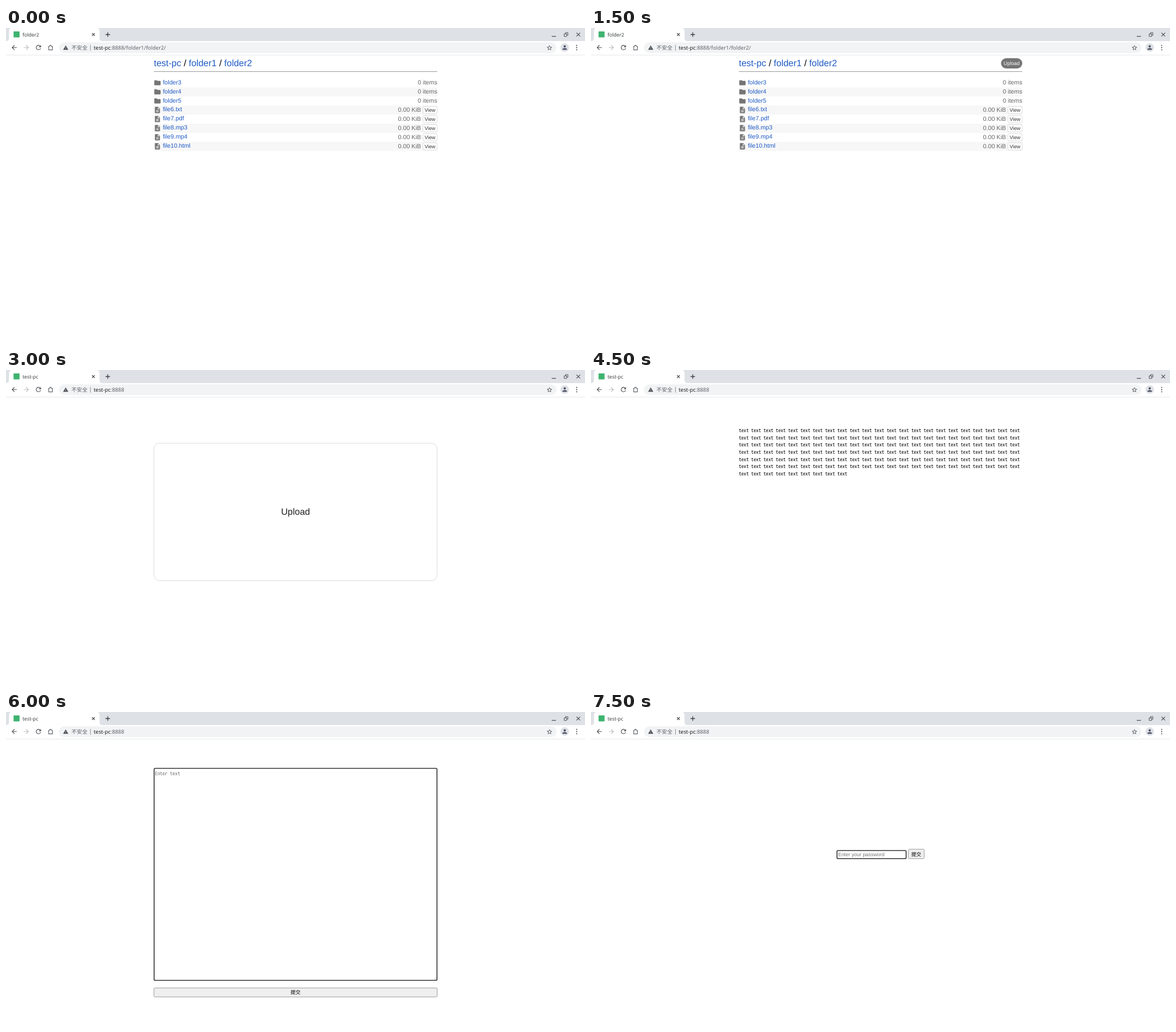
Animation of 1017 by 551 pixels, one loop 9000 ms. Source, as an HTML page with a canvas:

```html
<!DOCTYPE html>
<html lang="en">
<head>
<meta charset="utf-8">
<style>
html, body { margin: 0; width: 100%; height: 100%; overflow: hidden; background: #fff; }
canvas { display: block; }
</style>
</head>
<body>
<canvas width="1017" height="551"></canvas>
<script>
const ctx = document.querySelector('canvas').getContext('2d');
ctx.textRendering = 'geometricPrecision';

const SANS = '"Liberation Sans", Arial, sans-serif';
const UI = '"Noto Sans", "Noto Sans CJK SC", sans-serif';
const CJK = '"Noto Sans CJK SC", sans-serif';
const MONO = '"Noto Sans Mono CJK SC", "Noto Sans Mono CJK JP", monospace';
const BODY = 10.667, SMALL = 8.889;
const LINK = '#205bc6', INK = '#3c4043', ICON = '#4d5156', GRAY = '#757575';
const LEFT = 259.7, RIGHT = 757.5, MIDDLE = 508.6;

const PATHS = {
  folder: 'M10 4H4c-1.1 0-2 .9-2 2v12c0 1.1.9 2 2 2h16c1.1 0 2-.9 2-2V8c0-1.1-.9-2-2-2h-8z',
  file: 'M14 2H6c-1.1 0-2 .9-2 2v16c0 1.1.9 2 2 2h12c1.1 0 2-.9 2-2V8zm2 16H8v-2h8zm0-4H8v-2h8zm-3-5V3.5L18.5 9z',
  back: 'M20 11H7.83l5.59-5.59L12 4l-8 8 8 8 1.41-1.41L7.83 13H20z',
  reload: 'M17.65 6.35A8 8 0 1 0 19.73 14h-2.08A6 6 0 1 1 16.22 7.78L13 11h7V4z',
  home: 'M12 3L3 10h2v11h14V10h2zM7 19V9.4l5-3.9 5 3.9V19z',
  warning: 'M1 21h22L12 2zm12-3h-2v-2h2zm0-4h-2v-4h2z',
  star: 'M22 9.24l-7.19-.62L12 2 9.19 8.63 2 9.24l5.46 4.73L5.82 21 12 17.27 18.18 21l-1.63-7.03zM12 15.4l-3.76 2.27 1-4.28-3.32-2.88 4.38-.38L12 6.1l1.71 4.04 4.38.38-3.32 2.88 1 4.28z',
  person: 'M12 12a4 4 0 1 0 0-8 4 4 0 0 0 0 8zm0 2c-2.67 0-8 1.34-8 4v2h16v-2c0-2.66-5.33-4-8-4z'
};

function text(str, x, y, size, color, font = SANS, align = 'left') {
  ctx.font = `${size}px ${font}`;
  ctx.fillStyle = color;
  ctx.textAlign = align;
  ctx.fillText(str, x, y);
  return x + ctx.measureText(str).width;
}

function rect(x, y, w, h, fill, radius = 0, border, line = 0.7) {
  ctx.beginPath();
  ctx.roundRect(x, y, w, h, radius);
  if (fill) { ctx.fillStyle = fill; ctx.fill(); }
  if (border) { ctx.strokeStyle = border; ctx.lineWidth = line; ctx.stroke(); }
}

function disc(x, y, r, color) {
  ctx.beginPath();
  ctx.arc(x, y, r, 0, 7);
  ctx.fillStyle = color;
  ctx.fill();
}

function stroke(path, color, width) {
  ctx.strokeStyle = color;
  ctx.lineWidth = width;
  ctx.stroke(new Path2D(path));
}

// Draws a 24-unit icon centred on (x, y).
function icon(name, x, y, color = ICON, size = 13.33, flip = 1) {
  ctx.save();
  ctx.translate(x, y);
  ctx.scale(flip * size / 24, size / 24);
  ctx.translate(-12, -12);
  ctx.fillStyle = color;
  ctx.fill(new Path2D(PATHS[name]), 'evenodd');
  ctx.restore();
}

function chrome(title, path) {
  rect(0, 0, 1017, 23, '#dee1e6');
  ctx.fillStyle = '#fff';
  ctx.fill(new Path2D('M0 23Q5.3 23 5.3 17.5V5.5Q5.3 0 10.5 0H159Q164.3 0 164.3 5.5V17.5Q164.3 23 169.5 23Z'));
  rect(13.3, 6, 10.5, 10.5, '#3eb370', 0.7);
  text(title, 29, 15, 8.667, INK, UI);
  stroke('M151.1 9.1l4.8 4.8m0-4.8l-4.8 4.8', INK, 1.2);
  stroke('M174.8 11.5h7.8m-3.9-3.9v7.8', INK, 1.3);
  stroke('M958.6 14.6h7.4M1002 8.3l6.4 6.4m0-6.4l-6.4 6.4', ICON, 1.2);
  stroke('M980.4 10.4h4.4v4.4h-4.4zM982.6 10v-1.8h4.4v4.4h-1.8', ICON, 1);

  icon('back', 14.5, 34.3);
  icon('back', 35.7, 34.3, '#babcbe', 13.33, -1);
  icon('reload', 57, 34.3);
  icon('home', 78.2, 34.3, ICON, 12.6);
  rect(93, 25.3, 874, 18.7, '#f1f3f4', 9.35);
  icon('warning', 104.9, 34.6, ICON, 10);
  text('不安全', 115, 38, 9.333, '#5f6368', CJK);
  rect(147.9, 29.7, 0.8, 10, '#70757a');
  const end = text('test-pc', 154, 37.8, 9.333, '#202124', UI);
  text(':8888' + path, end, 37.8, 9.333, '#5f6368', UI);
  icon('star', 954.6, 34.7, ICON, 11.5);
  disc(981.4, 34.3, 7.5, '#dee1e6');
  icon('person', 981.4, 34.3, '#4b5063', 12);
  for (const y of [30.6, 34.4, 38.2]) disc(1002.4, y, 1.05, ICON);
  rect(0, 47, 1017, 0.8, '#dfe1e4');
}

function listing(canUpload) {
  chrome('folder2', '/folder1/folder2/');
  let x = LEFT;
  for (const [str, color] of [['test-pc', LINK], [' / ', '#000'], ['folder1', LINK], [' / ', '#000'], ['folder2', LINK]])
    x = text(str, x, 67.2, 16, color);
  rect(LEFT, 76.1, RIGHT - LEFT, 0.9, '#999');
  if (canUpload) {
    rect(720.2, 53, 37.3, 18, GRAY, 9);
    text('Upload', 738.9, 65, SMALL, '#fff', SANS, 'center');
  }
  const names = ['folder3', 'folder4', 'folder5', 'file6.txt', 'file7.pdf', 'file8.mp3', 'file9.mp4', 'file10.html'];
  names.forEach((name, i) => {
    const y = 88.3 + i * 15.93, isFile = i > 2;
    if (i % 2) rect(LEFT, y, RIGHT - LEFT, 15.93, '#f7f7f7');
    icon(isFile ? 'file' : 'folder', 266, y + 7.8, GRAY);
    text(name, 275.4, y + 10.4, BODY, LINK);
    if (isFile) {
      text('0.00 KiB', 728.9, y + 11, BODY, '#666', SANS, 'right');
      rect(732.3, y + 1.6, 24.9, 12.6, '#fff', 2, '#ccc');
      text('View', 744.7, y + 11.1, SMALL, '#333', SANS, 'center');
    } else {
      text('0 items', RIGHT, y + 10.4, BODY, '#666', SANS, 'right');
    }
  });
}

function submitButton(x, y, w, h, baseline) {
  rect(x, y, w, h, '#efefef', 1.7, '#767676');
  text('提交', x + w / 2, baseline, SMALL, '#000', CJK, 'center');
}

function page(draw) {
  return () => { chrome('test-pc', ''); draw(); };
}

const scenes = [
  () => listing(false),
  () => listing(true),
  page(() => {
    rect(259.8, 128.4, 497.4, 241.2, null, 10, '#ccc');
    text('Upload', MIDDLE, 254, 16, '#222', SANS, 'center');
  }),
  page(() => {
    for (let row = 0; row < 7; row++)
      text('text '.repeat(row < 6 ? 23 : 9), LEFT, 109 + row * 12.667, 8.667, '#000', MONO);
  }),
  page(() => {
    rect(260.2, 98.9, 496.8, 372, '#fff', 1.5, '#101010', 1.35);
    text('Enter text', 261.5, 111, SMALL, GRAY, MONO);
    stroke('M752 469.5l4-4M754.3 469.5l1.7-1.7', '#888', 0.6);
    submitButton(259.9, 484.2, 497.4, 15.8, 495.4);
  }),
  page(() => {
    rect(432.1, 243.1, 121.4, 14.2, '#fff', 1.5, '#101010', 1.35);
    text('Enter your password', 434, 252.9, SMALL, GRAY);
    submitButton(557.4, 240.8, 27.8, 16.6, 252.8);
  })
];

function frame() {
  const index = Math.floor(performance.now() / 1500) % scenes.length;
  rect(0, 0, 1017, 551, '#fff');
  scenes[index]();
  requestAnimationFrame(frame);
}
frame();
</script>
</body>
</html>
```
